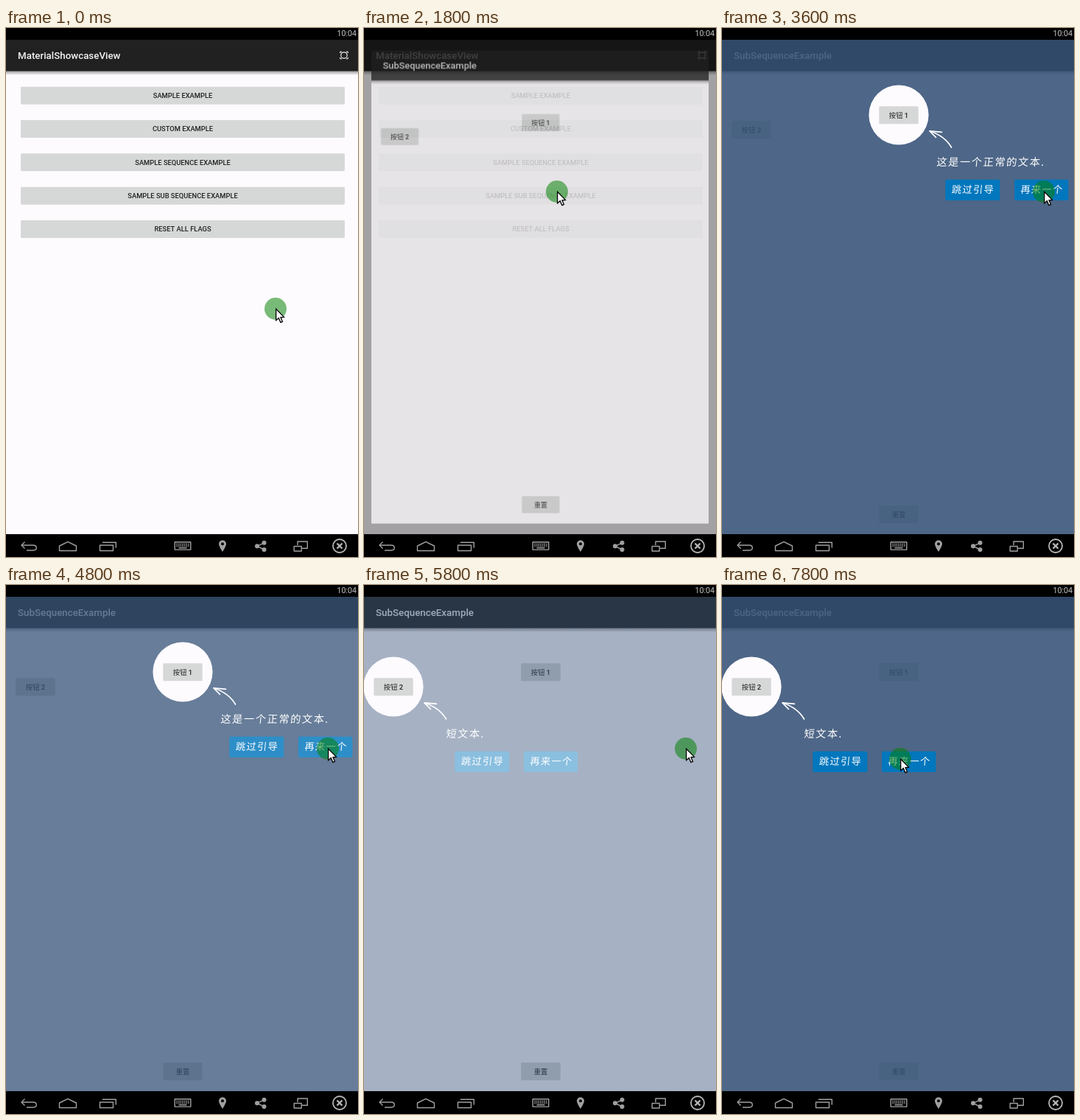
Recreate the animation shown at these times as an HTML page with a canvas. Size 478 px wide and 718 px high, loop 8 s.

```html
<!DOCTYPE html>
<html lang="en">
<head>
<meta charset="utf-8">
<title>Showcase demo</title>
<style>
html, body { margin: 0; width: 100%; height: 100%; overflow: hidden; background: #000; }
canvas { display: block; width: 478px; height: 718px; }
</style>
</head>
<body>
<canvas id="stage"></canvas>
<script>
const W = 478, H = 718, TOP = 16, BOTTOM = 687, LOOP = 8000, STEP = 200;
const UI = '"Roboto", "Noto Sans CJK SC", "Noto Sans CJK", sans-serif';
const CJK = '"Noto Sans CJK SC", "Noto Sans CJK", sans-serif';
const dpr = window.devicePixelRatio || 1;

function setup(canvas) {
  canvas.width = W * dpr;
  canvas.height = H * dpr;
  const c = canvas.getContext('2d');
  c.scale(dpr, dpr);
  return c;
}
const main = setup(document.getElementById('stage'));
const layer = setup(document.createElement('canvas'));
let g = main;

// time, x, y of the pointer
const POINTER = [
  [0, 366, 381], [200, 367, 394], [400, 367, 394], [1200, 262, 222],
  [3000, 262, 222], [3600, 437, 222], [6000, 437, 222], [6800, 230, 243], [7000, 242, 236]
];
// time, opacity of the showcase
const FADE = [
  [2000, 0], [2200, 0.19], [2400, 1], [4600, 1], [4800, 0.85],
  [5000, 0.3], [5200, 0], [5600, 0], [5800, 0.5], [6000, 1]
];

function track(keys, t) {
  if (t <= keys[0][0]) return keys[0].slice(1);
  for (let i = 1; i < keys.length; i++) {
    const a = keys[i - 1], b = keys[i];
    if (t <= b[0]) {
      const k = (t - a[0]) / (b[0] - a[0]);
      return a.slice(1).map((v, j) => v + (b[j + 1] - v) * k);
    }
  }
  return keys[keys.length - 1].slice(1);
}

function rect(x, y, w, h, color, r = 0) {
  g.fillStyle = color;
  g.beginPath();
  g.roundRect(x, y, w, h, r);
  g.fill();
}

function text(s, x, y, font, color, align = 'left') {
  g.font = font;
  g.fillStyle = color;
  g.textAlign = align;
  g.fillText(s, x, y);
}

function line(points, close) {
  g.beginPath();
  points.forEach(([x, y]) => g.lineTo(x, y));
  if (close) g.closePath();
  g.stroke();
}

function disc(x, y, r, color) {
  g.fillStyle = color;
  g.beginPath();
  g.arc(x, y, r, 0, 7);
  g.fill();
}

function button(label, x, y, w, pressed) {
  rect(x, y, w, 24, pressed ? '#c2c3c3' : '#d6d7d7', 1.4);
  text(label, x + w / 2, y + 15.3, `500 9.33px ${UI}`, '#212121', 'center');
}

function page(title) {
  rect(0, TOP, W, BOTTOM - TOP, '#fefbff');
  const shadow = g.createLinearGradient(0, 58, 0, 64);
  shadow.addColorStop(0, 'rgba(0,0,0,.42)');
  shadow.addColorStop(1, 'rgba(0,0,0,0)');
  rect(0, 58, W, 6, shadow);
  rect(0, TOP, W, 42.5, '#212121');
  text(title, 16, 42.3, `500 13.33px ${UI}`, '#f4f4f4');
}

function mainPage(pressed) {
  page('MaterialShowcaseView');
  g.strokeStyle = '#e8e8e8';
  g.lineWidth = 1.2;
  g.beginPath();
  g.arc(459, 37, 4.2, 0, 7);
  g.stroke();
  for (const sx of [-1, 1]) for (const sy of [-1, 1]) {
    line([[459 + sx * 5.5, 37 + sy * 2.8], [459 + sx * 5, 37 + sy * 4.6], [459 + sx * 3, 37 + sy * 4.8]]);
  }
  ['SAMPLE EXAMPLE', 'CUSTOM EXAMPLE', 'SAMPLE SEQUENCE EXAMPLE',
    'SAMPLE SUB SEQUENCE EXAMPLE', 'RESET ALL FLAGS']
    .forEach((s, i) => button(s, 20, 79.7 + i * 45.33, 440, pressed && i === 3));
}

function subPage() {
  page('SubSequenceExample');
  button('按钮 1', 213.3, 106.3, 53.4);
  button('按钮 2', 13.3, 126.3, 53.4);
  button('重置', 213.3, 648.3, 53.4);
}

// The new page zooms in, see-through, over the dimmed old one.
function opening() {
  mainPage();
  rect(0, TOP, W, BOTTOM - TOP, 'rgba(0,0,0,.36)');
  g = layer;
  g.clearRect(0, 0, W, H);
  subPage();
  g = main;
  const mid = (TOP + BOTTOM) / 2;
  g.save();
  g.globalAlpha = 0.75;
  g.translate(W / 2, mid);
  g.scale(0.957, 0.957);
  g.drawImage(layer.canvas, -W / 2, -mid, W, H);
  g.restore();
}

function handwriting(s, x, y, size, pitch) {
  g.save();
  g.translate(x, y);
  g.transform(1, 0, -0.1, 1, 0, 0);
  g.letterSpacing = pitch - size + 'px';
  text(s, 0, 0, `300 ${size}px ${CJK}`, '#fff');
  g.restore();
}

function showcase(x, second, pressed) {
  const [hx, hy] = second ? [40, 138] : [240, 118];
  g.fillStyle = `rgba(51,80,117,${0.867 * x})`;
  g.beginPath();
  g.rect(0, TOP, W, BOTTOM - TOP);
  g.arc(hx, hy, 40.6, 0, 7);
  g.fill('evenodd');

  g.save();
  g.globalAlpha = Math.min(1, 0.7 + x);
  g.translate(hx - 240, hy - 118);
  g.strokeStyle = '#fff';
  g.lineWidth = 1.7;
  g.lineCap = g.lineJoin = 'round';
  g.beginPath();
  g.moveTo(311.5, 162);
  g.quadraticCurveTo(303, 147, 282.5, 140);
  g.stroke();
  line([[298.5, 141.3], [282, 139.8], [290.5, 148.5]]);
  g.restore();

  const k = Math.pow(x, 1.2);
  const mix = (a, b) => Math.round(a + (b - a) * k);
  const blue = `rgb(${mix(245, 2)},${mix(246, 119)},${mix(250, 189)})`;
  g.save();
  if (second) g.translate(-180, 20);
  rect(303.3, 205.7, 74, 28.4, blue, 2);
  rect(397, 205.7, 73.4, 28.4, blue, 2);
  if (pressed) rect(397, 205.7, 73.4, 28.4, 'rgba(255,255,255,.16)', 2);
  g.globalAlpha = Math.min(1, 0.7 + x);
  handwriting(second ? '短文本.' : '这是一个正常的文本.', 291, 187, 14.2, 15.8);
  handwriting('跳过引导', 311.5, 224, 13.3, 14.5);
  handwriting('再来一个', 405, 224, 13.3, 14.5);
  g.restore();
}

function pointer(x, y, pressed) {
  disc(x, y, pressed ? 15.7 : 15, 'rgba(0,128,0,.53)');
  g.save();
  g.translate(x + 0.7, y + 0.4);
  g.beginPath();
  [[0, 0], [0, 15.5], [3.6, 12.3], [6.2, 18.2], [8.8, 17.2], [6.3, 11.4], [10.8, 11]]
    .forEach(([px, py]) => g.lineTo(px, py));
  g.closePath();
  g.fillStyle = '#fff';
  g.fill();
  g.strokeStyle = '#000';
  g.lineWidth = 1.3;
  g.lineJoin = 'miter';
  g.stroke();
  g.restore();
}

function bars() {
  rect(0, 0, W, TOP, '#000');
  text('10:04', 476, 11.3, `400 10.67px ${UI}`, '#c8c8c8', 'right');
  rect(0, BOTTOM, W, H - BOTTOM, '#000');
  g.strokeStyle = '#a0a0a0';
  g.lineWidth = 1.4;
  g.lineCap = 'butt';
  g.lineJoin = 'round';
  // back
  line([[25.5, 697.5], [21, 702], [25.5, 706.5]]);
  g.beginPath();
  g.moveTo(21, 702);
  g.lineTo(37, 702);
  g.quadraticCurveTo(41.3, 702, 41.3, 705.6);
  g.quadraticCurveTo(41.3, 709, 37, 709);
  g.lineTo(28, 709);
  g.stroke();
  // home
  line([[72.5, 703], [84, 697.3], [95.5, 703], [95.5, 709.5], [72.5, 709.5]], true);
  // recents
  g.strokeRect(127.5, 702, 18, 7.5);
  line([[131, 698.3], [149.3, 698.3], [149.3, 705.5]]);
  // keyboard
  g.strokeRect(229.2, 697.7, 21.6, 10.4);
  for (let r = 0; r < 2; r++) for (let i = 0; i < 7; i++) {
    rect(231.3 + i * 2.6, 699.8 + r * 2.4, 1.7, 1.5, '#a0a0a0');
  }
  rect(234.5, 704.8, 11, 1.6, '#a0a0a0');
  // pin
  g.fillStyle = '#a0a0a0';
  g.beginPath();
  g.arc(294, 700.3, 5, Math.PI * 0.9, Math.PI * 2.1);
  g.quadraticCurveTo(297.5, 706, 294, 711);
  g.quadraticCurveTo(290.5, 706, 289.2, 701.8);
  g.fill();
  disc(294, 700.3, 2, '#000');
  // share
  line([[350.5, 698.8], [341, 703.3], [350.5, 708]]);
  for (const [x, y] of [[350.5, 698.8], [341, 703.3], [350.5, 708]]) disc(x, y, 3, '#a0a0a0');
  // windows
  line([[396, 702], [396, 697], [409.3, 697], [409.3, 706.3], [402, 706.3]]);
  g.strokeRect(391.2, 703.5, 10, 6.5);
  // close
  g.strokeStyle = '#b4b4b4';
  g.lineWidth = 1.8;
  g.beginPath();
  g.arc(453, 703, 9, 0, 7);
  g.stroke();
  g.lineWidth = 2.4;
  line([[449.5, 699.5], [456.5, 706.5]]);
  line([[456.5, 699.5], [449.5, 706.5]]);
}

function draw(t) {
  const [x, y] = track(POINTER, t);
  const [fade] = track(FADE, t);
  const tap = t >= 1400 && t < 1800;
  const next = t === 4600 || t === 7600;
  if (t < 1800) mainPage(tap);
  else if (t < 2000) opening();
  else subPage();
  if (fade > 0) showcase(fade, t >= 5400, next);
  bars();
  pointer(x, y, tap || next);
}

const start = performance.now();
function tick() {
  const t = Math.max(0, performance.now() - start) % LOOP;
  draw(Math.floor(t / STEP) * STEP);
  requestAnimationFrame(tick);
}
tick();
</script>
</body>
</html>
```
